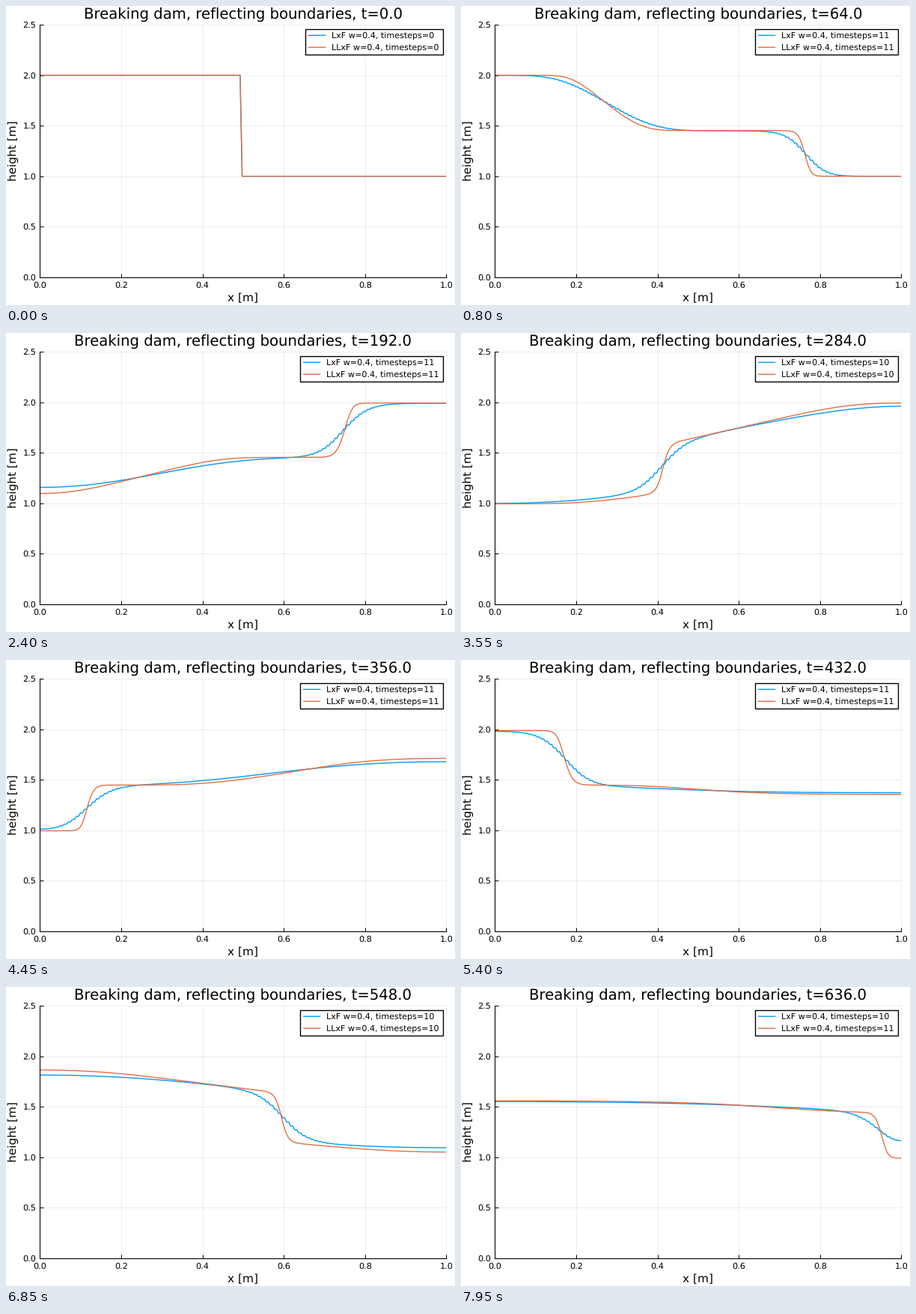
Animation, 600 px wide and 400 px high, one loop 8 s. Source, as a matplotlib script:

```python
import numpy as np
import matplotlib.pyplot as plt
from matplotlib.animation import FuncAnimation
from matplotlib.patches import Rectangle

W, H, DPI = 600, 400, 100
LEFT, RIGHT, TOP, BOTTOM = 45.4, 588.45, 25.05, 362.8
FRAMES, INTERVAL = 160, 50
G, CFL, N, STEP = 9.81, 0.4, 200, 0.004
DX = 1 / N
BLUE, ORANGE = "#009AFA", "#E36F47"
DIGIT, LETTER_L = 7.1, 6.2  # legend glyph widths in pixels

plt.rcParams.update({"font.family": "DejaVu Sans", "text.hinting": "none"})


# ---- shallow water solver ----
def flux(q):
    h, m = q
    return np.array([m, m * m / h + 0.5 * G * h * h])


def speed(q):
    return np.abs(q[1] / q[0]) + np.sqrt(G * q[0])


def with_ghosts(q):
    """Add a mirrored cell beyond each wall."""
    g = np.pad(q, ((0, 0), (1, 1)), mode="edge")
    g[1, [0, -1]] *= -1
    return g


def advance(q, dt, local):
    """One Lax-Friedrichs step between reflecting walls."""
    g = with_ghosts(q)
    f = flux(g)
    if local:
        s = speed(g)
        a = np.maximum(s[:-1], s[1:])
    else:
        a = DX / dt
    face = 0.5 * (f[:, :-1] + f[:, 1:]) - 0.5 * a * (g[:, 1:] - g[:, :-1])
    return q - dt / DX * (face[:, 1:] - face[:, :-1])


def simulate(local):
    """Height profile (ghost cells included) and step count for every frame."""
    q = np.array([np.where(np.arange(N) < N // 2 - 1, 2.0, 1.0), np.zeros(N)])
    out = [(with_ghosts(q)[0], 0)]
    for _ in range(FRAMES - 1):
        left, steps = STEP, 0
        while left > 1e-12:
            dt = min(CFL * DX / speed(q).max(), left)
            q = advance(q, dt, local)
            left -= dt
            steps += 1
        out.append((with_ghosts(q)[0], steps))
    return out


x = np.linspace(0, 1, N + 2)
runs = [simulate(False), simulate(True)]

# ---- plot ----
fig = plt.figure(figsize=(W / DPI, H / DPI), dpi=DPI, facecolor="white")
ax = fig.add_axes([LEFT / W, 1 - BOTTOM / H, (RIGHT - LEFT) / W, (BOTTOM - TOP) / H])
ax.set(xlim=(0, 1), ylim=(0, 2.5))
xticks, yticks = np.linspace(0, 1, 6), np.linspace(0, 2.5, 6)
ax.set_xticks(xticks, [])
ax.set_yticks(yticks, [])
ax.tick_params(direction="in", length=3.6, width=0.72)
ax.grid(color="black", alpha=0.1, linewidth=0.5, clip_on=False)
ax.set_axisbelow(True)
for side in ("top", "right"):
    ax.spines[side].set_visible(False)
for side in ("left", "bottom"):
    ax.spines[side].set_linewidth(0.8)
curves = [ax.plot(x, x, color=c, lw=1, snap=False)[0] for c in (BLUE, ORANGE)]

# overlay in pixel coordinates for labels and legend
ui = fig.add_axes([0, 0, 1, 1])
ui.set(xlim=(0, W), ylim=(H, 0))
ui.axis("off")


def label(px, py, s, size, ha="center", **kw):
    return ui.text(px, py, s, fontsize=size, ha=ha, va="baseline", **kw)


mid = (LEFT + RIGHT) / 2
title = label(mid, 17, "", 14.15)
label(mid, 395, "x [m]", 11.12)
label(14, 193.4, "height [m]", 11.12, rotation=90, rotation_mode="anchor")
for v in xticks:
    label(LEFT + v * (RIGHT - LEFT), 377, f"{v:.1f}", 8.09)
for v in yticks:
    label(40.5, BOTTOM - v / 2.5 * (BOTTOM - TOP) + 4, f"{v:.1f}", 8.09, ha="right")

box = ui.add_patch(Rectangle((400, 30.5), 184, 34, fc="white", ec="black", lw=1,
                             joinstyle="round"))
keys = [ui.plot([], [], color=c, lw=1, snap=False)[0] for c in (BLUE, ORANGE)]
names = [label(435, y, "", 8.04, ha="left") for y in (43, 59)]


def draw(k):
    title.set_text(f"Breaking dam, reflecting boundaries, t={k * STEP * 1000:.1f}")
    counts = [run[k][1] for run in runs]
    extra = [DIGIT * (len(str(n)) - 1) for n in counts]
    start = 434.7 - max(extra[0] - LETTER_L, extra[1])
    box.set_x(start - 34.4)
    box.set_width(583.6 - box.get_x())
    for i, name in enumerate(("LxF", "LLxF")):
        curves[i].set_ydata(runs[i][k][0])
        y = 39.3 + 16 * i
        keys[i].set_data([start - 30, start - 8], [y, y])
        names[i].set_text(f"{name} w=0.4, timesteps={counts[i]}")
        names[i].set_x(start)
    return [title, box, *curves, *keys, *names]


anim = FuncAnimation(fig, draw, frames=FRAMES, init_func=lambda: draw(0),
                     interval=INTERVAL, repeat=True, repeat_delay=0, blit=False)
plt.show()
```
